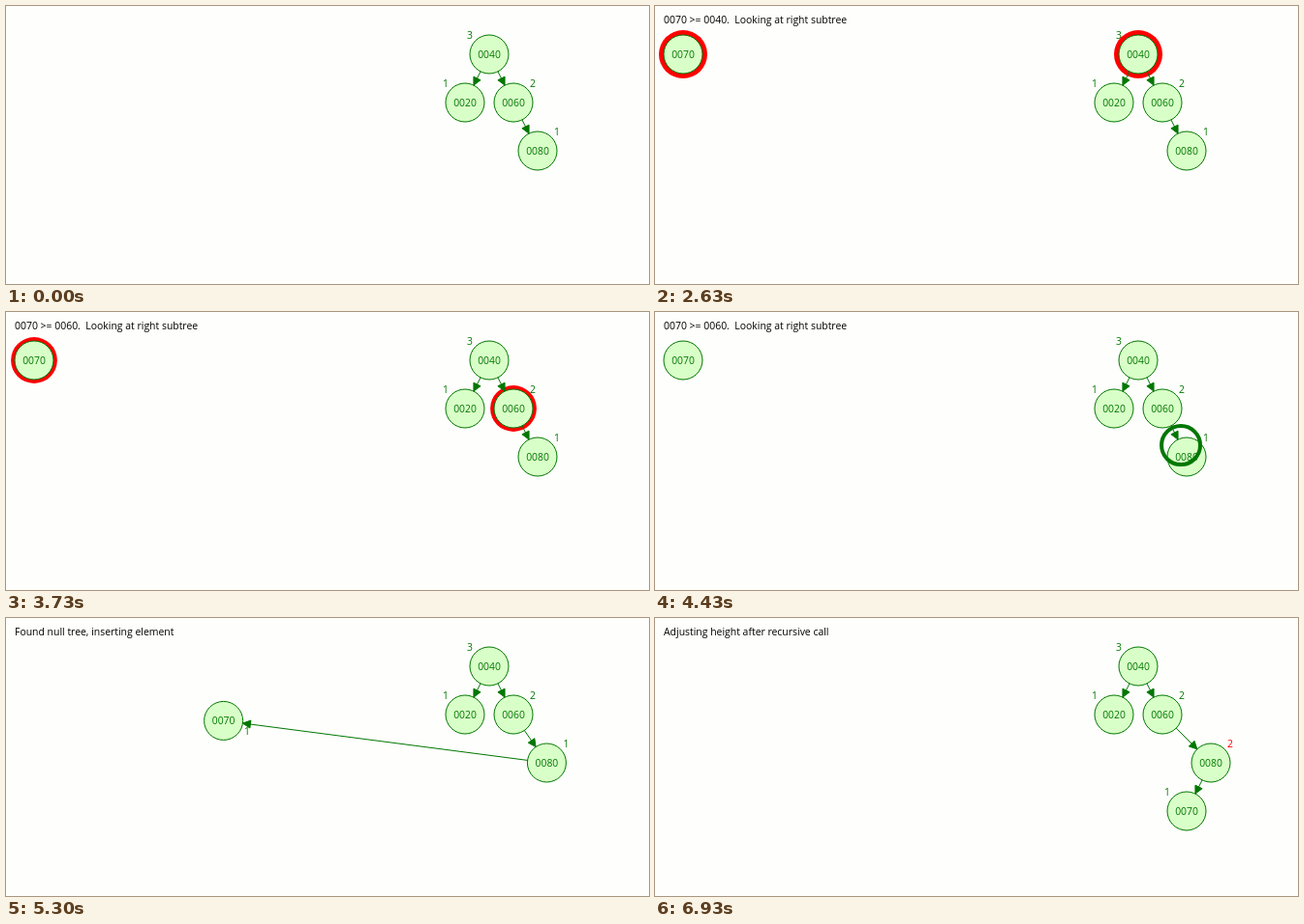
An HTML page with a canvas for the animation above (8 s loop, 664 by 288 pixels).

```html
<!DOCTYPE html>
<html lang="en">
<head>
<meta charset="utf-8">
<title>AVL tree insertion</title>
<style>
html, body { margin: 0; width: 100%; height: 100%; overflow: hidden; background: #fefefc; }
canvas { display: block; }
</style>
</head>
<body>
<canvas id="stage" width="664" height="288"></canvas>
<script>
const ctx = document.getElementById('stage').getContext('2d');
const LOOP = 8000, R = 20;
const PAPER = '#fefefc', GREEN = '#007700', FILL = '#d9ffc8', RED = '#ff0000';
const FACE = '"Open Sans", "Noto Sans", sans-serif';

// Start of each step of the insertion
const T = {
  create: 1330, at40: 2230, to60: 3060, at60: 3540, to80: 4050,
  at80: 4550, place: 5064, unwind: 5694, slow: 6030, adjust: 6930
};

const messages = [
  [T.adjust, 'Adjusting height after recursive call'],
  [T.unwind, 'Unwinding Recursion'],
  [T.place, 'Found null tree, inserting element'],
  [T.at80, '0070 < 0080.  Looking at left subtree'],
  [T.at60, '0070 >= 0060.  Looking at right subtree'],
  [T.at40, '0070 >= 0040.  Looking at right subtree'],
  [T.create, ' Inserting 0070'],
  [0, '']
];

const mix = (a, b, p) => a + (b - a) * p;
const between = (t, a, b) => t >= a && t < b;
const progress = (t, a, b) => Math.min(1, Math.max(0, (t - a) / (b - a)));

function circle(x, y, r) {
  ctx.beginPath();
  ctx.arc(x, y, r, 0, Math.PI * 2);
}

function text(str, x, y, color, align = 'center') {
  ctx.fillStyle = color;
  ctx.textAlign = align;
  ctx.fillText(str, x, y);
}

function node(n, halo) {
  if (halo) {
    circle(n.x, n.y, R + halo);
    ctx.fillStyle = RED;
    ctx.fill();
  }
  circle(n.x, n.y, R);
  ctx.fillStyle = FILL;
  ctx.fill();
  ctx.lineWidth = 1;
  ctx.strokeStyle = GREEN;
  ctx.stroke();
  text(n.name, n.x, n.y + 3.5, GREEN);
}

function edge(a, b) {
  const d = Math.hypot(b.x - a.x, b.y - a.y);
  const ux = (b.x - a.x) / d, uy = (b.y - a.y) / d;
  const x = b.x - ux * R, y = b.y - uy * R;
  ctx.lineWidth = 1;
  ctx.strokeStyle = ctx.fillStyle = GREEN;
  ctx.beginPath();
  ctx.moveTo(a.x + ux * R, a.y + uy * R);
  ctx.lineTo(x, y);
  ctx.stroke();
  ctx.beginPath();
  ctx.moveTo(x, y);
  ctx.lineTo(x - ux * 8 - uy * 4, y - uy * 8 + ux * 4);
  ctx.lineTo(x - ux * 8 + uy * 4, y - uy * 8 - ux * 4);
  ctx.closePath();
  ctx.fill();
  ctx.stroke();
}

function ring(a, b, p) {
  circle(mix(a.x, b.x, p), mix(a.y, b.y, p), R);
  ctx.lineWidth = 4;
  ctx.strokeStyle = GREEN;
  ctx.stroke();
}

function haloSize(t) {
  const phase = (((t - 2630) / 58.3 + 6) % 10 + 10) % 10;
  return 3 + Math.abs(phase - 4);
}

function draw(t) {
  ctx.fillStyle = PAPER;
  ctx.fillRect(0, 0, 664, 288);
  ctx.textBaseline = 'alphabetic';

  const p = progress(t, T.place, T.unwind);
  const n40 = { name: '0040', x: 499, y: 50 };
  const n20 = { name: '0020', x: 474, y: 100 };
  const n60 = { name: '0060', x: 524, y: 100 };
  const n80 = { name: '0080', x: mix(549, 574, p), y: 150 };
  const n70 = { name: '0070', x: mix(29, 549, p), y: mix(50, 200, p) };

  const active = between(t, T.at40, T.to60) ? n40
    : between(t, T.at60, T.to80) ? n60
    : between(t, T.at80, T.place) ? n80 : null;
  const nodes = [n40, n20, n60, n80];
  if (t >= T.create) nodes.push(n70);

  ctx.font = '10.45px ' + FACE;
  text(messages.find(m => t >= m[0])[1], 9, 18, '#000', 'left');

  ctx.font = '10.35px ' + FACE;
  const lit = n => active && (n === active || n === n70);
  nodes.filter(n => !lit(n)).forEach(n => node(n, 0));

  text('3', 479, 33.5, GREEN);
  text('1', 454, 83.5, GREEN);
  text('2', 544, 83.5, GREEN);
  const grown = t >= T.adjust;
  text(grown ? '2' : '1', n80.x + 20, 133.5, grown ? RED : GREEN);
  if (t >= T.place) text('1', mix(80, 529, p), mix(83.5, 183.5, p), GREEN);

  nodes.filter(lit).forEach(n => node(n, haloSize(t)));

  if (between(t, T.to60, T.at60)) ring(n40, n60, progress(t, T.to60, T.at60));
  if (between(t, T.to80, T.at80)) ring(n60, n80, progress(t, T.to80, T.at80));
  if (between(t, T.unwind, T.adjust)) {
    const q = 0.535 * progress(t, T.unwind, T.slow) + 0.465 * progress(t, T.slow, T.adjust);
    ring(n70, n80, q);
  }

  edge(n40, n20);
  edge(n40, n60);
  edge(n60, n80);
  if (t >= T.place) edge(n80, n70);
}

const start = performance.now();
function tick() {
  draw((performance.now() - start) % LOOP);
  requestAnimationFrame(tick);
}
tick();
</script>
</body>
</html>
```
